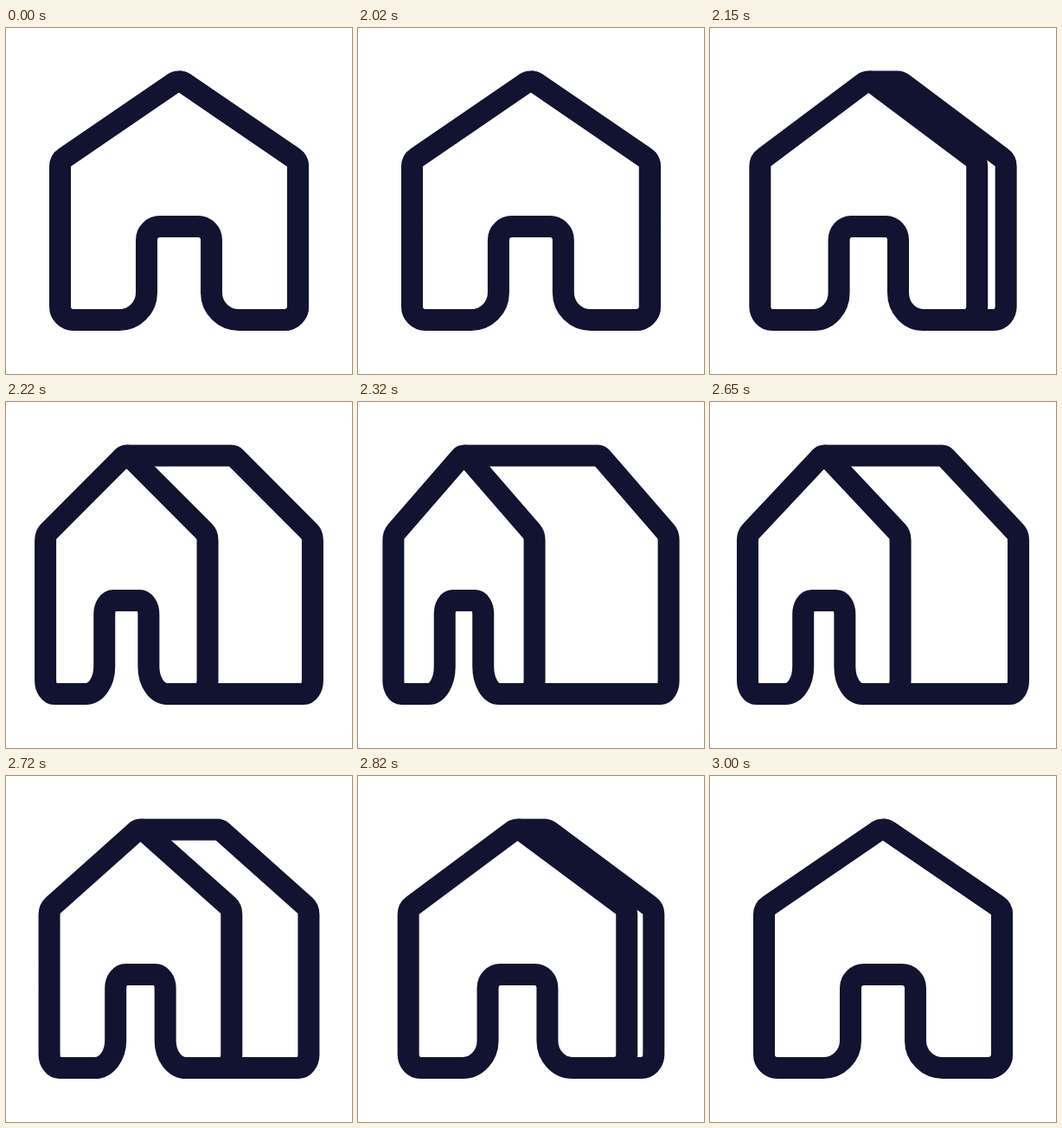
Animation, 400 px wide and 400 px high, one loop 3020 ms. Source, as an HTML page:

```html
<!DOCTYPE html>
<html lang="en">
<head>
<meta charset="utf-8">
<title>Turning house</title>
<style>
  html, body { margin: 0; width: 100%; height: 100%; overflow: hidden; background: #fff; }
  svg { display: block; width: 100vw; height: 100vh; }
  path { fill: none; stroke: #121331; stroke-width: 25; stroke-linejoin: round; }
</style>
</head>
<body>
<svg viewBox="0 0 400 400">
  <path id="back"/>
  <path id="front"/>
</svg>
<script>
const LOOP = 3020, START = 2000, TURNED = 2525, END = 3000;
const SHIFT = 145;      // travel of the front's right wall
const LEFT_RATIO = 0.162; // left wall travel relative to the right wall
const back = document.getElementById('back');
const front = document.getElementById('front');

// Cubic bezier easing with y handles at 0 and 1
function ease(u, x1, x2) {
  let lo = 0, hi = 1;
  for (let i = 0; i < 30; i++) {
    const t = (lo + hi) / 2, r = 1 - t;
    if (3 * r * r * t * x1 + 3 * r * t * t * x2 + t * t * t < u) lo = t;
    else hi = t;
  }
  return lo * lo * (3 - 2 * lo);
}

function turnAt(ms) {
  if (ms <= START || ms >= END) return 0;
  if (ms < TURNED) return ease((ms - START) / (TURNED - START), 0.6, 0);
  return 1 - ease((ms - TURNED) / (END - TURNED), 0.4, 0.4);
}

function draw(turn) {
  const d = SHIFT * turn;
  const cx = 200 - d * (1 + LEFT_RATIO) / 2;
  const s = 1 - d * (1 - LEFT_RATIO) / 275;

  // Path helpers for a house squeezed horizontally around a centre
  const pen = c => {
    const at = (x, y) => `${(c + (x - 200) * s).toFixed(3)} ${y}`;
    return {
      at,
      line: (x, y) => 'L' + at(x, y),
      arc: (r, sweep, x, y) => `A${r * s} ${r} 0 0 ${sweep} ` + at(x, y)
    };
  };

  const f = pen(cx);
  front.setAttribute('d', [
    'M' + f.at(193, 64.2),
    f.line(68, 149.7), f.arc(12.5, 0, 62.5, 160),
    f.line(62.5, 322), f.arc(15.5, 0, 78, 337.5),
    f.line(131, 337.5), f.arc(31.5, 0, 162.5, 306),
    f.line(162.5, 245), f.arc(15.5, 1, 178, 229.5),
    f.line(222, 229.5), f.arc(15.5, 1, 237.5, 245),
    f.line(237.5, 306), f.arc(31.5, 0, 269, 337.5),
    f.line(322, 337.5), f.arc(15.5, 0, 337.5, 322),
    f.line(337.5, 160), f.arc(12.5, 0, 332, 149.7),
    f.line(207, 64.2), f.arc(12.5, 0, 193, 64.2), 'Z'
  ].join(''));

  const b = pen(400 - cx);
  back.setAttribute('d', [
    'M' + f.at(200, 62), b.line(200, 62), b.arc(12.5, 1, 207, 64.2),
    b.line(332, 149.7), b.arc(12.5, 1, 337.5, 160),
    b.line(337.5, 322), b.arc(15.5, 1, 322, 337.5),
    f.line(322, 337.5)
  ].join(''));
}

// Forty pictures a second, on alternating 20 and 30 ms steps
function snap(ms) {
  const rest = ms % 50;
  return ms - rest + (rest < 20 ? 0 : 20);
}

const origin = performance.now();
function tick() {
  const ms = (performance.now() - origin) % LOOP;
  draw(turnAt(snap(ms)));
  requestAnimationFrame(tick);
}
tick();
</script>
</body>
</html>
```
